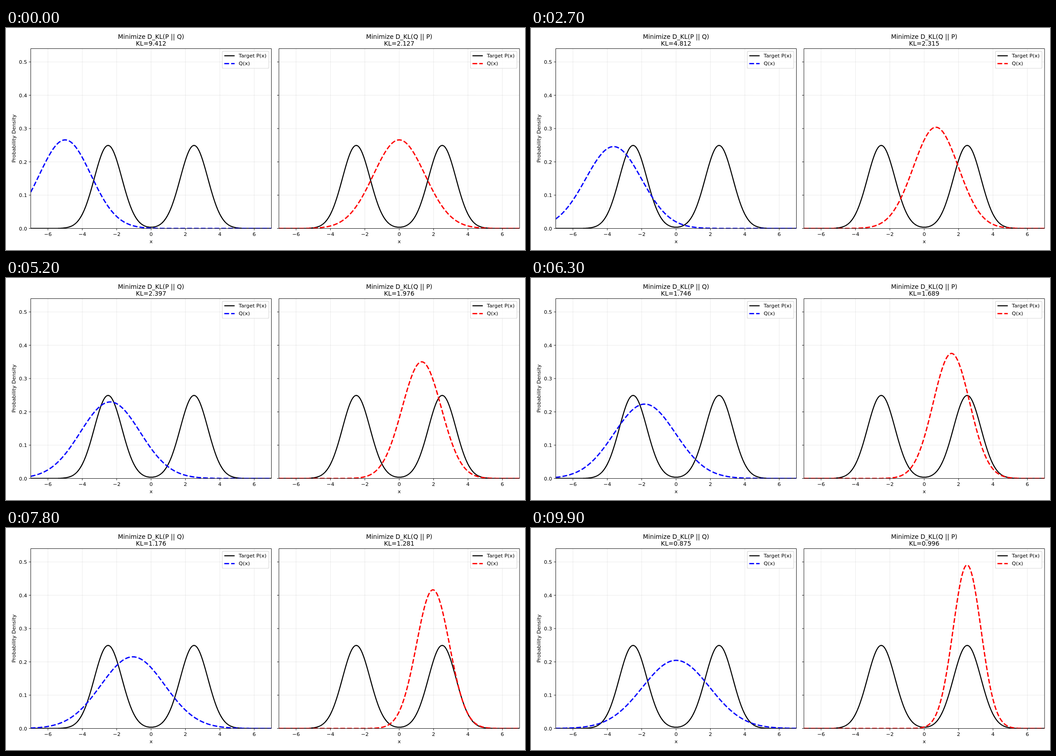
An HTML page with a canvas that plays this animation: 1143x490 px, repeating every 10 s.

```html
<!DOCTYPE html>
<html lang="en">
<head>
<meta charset="utf-8">
<title>Forward and reverse KL divergence</title>
<style>
  html, body { margin: 0; width: 100%; height: 100%; overflow: hidden; background: #fff; }
  canvas { display: block; }
</style>
</head>
<body>
<canvas id="stage" width="1143" height="490"></canvas>
<script>
const ctx = document.getElementById('stage').getContext('2d');
const FRAMES = 100, FRAME_MS = 100;
const PT = 1.134;                       // one typographic point in pixels
const TOP = 45.5, BOTTOM = 442.5, WIDTH = 530;
const Y_MAX = 0.54, SAMPLES = 700, DX = 14 / SAMPLES;
const xs = Array.from({ length: SAMPLES + 1 }, (_, i) => -7 + i * DX);

const gauss = (x, mean, sd) =>
  Math.exp(-((x - mean) ** 2) / (2 * sd * sd)) / (sd * Math.sqrt(2 * Math.PI));
const target = xs.map(x => (gauss(x, -2.5, 0.8) + gauss(x, 2.5, 0.8)) / 2);
const lerp = ([a, b], u) => a + (b - a) * u;

// Divergence in bits
const divergence = (a, b) =>
  a.reduce((sum, p, i) => sum + p * Math.log2(p / Math.max(b[i], 1e-10)) * DX, 0);

const panels = [
  { left: 54.5, name: 'P || Q', color: '#00f', mean: [-5, 0], sd: [1.5, 1.95],
    kl: q => divergence(target, q), yLabels: true },
  { left: 601, name: 'Q || P', color: '#f00', mean: [0, 2.4918], sd: [1.5, 0.8128],
    kl: q => divergence(q, target) }
];

const py = v => BOTTOM - v / Y_MAX * (BOTTOM - TOP);

function line(points, color, width, dashed) {
  ctx.beginPath();
  points.forEach(([x, y]) => ctx.lineTo(x, y));
  ctx.strokeStyle = color;
  ctx.lineWidth = width * PT;
  ctx.setLineDash(dashed ? [3.7 * width * PT, 1.6 * width * PT] : []);
  ctx.stroke();
  ctx.setLineDash([]);
}

function text(str, x, y, align = 'center', points = 10) {
  ctx.font = `${points * PT}px "DejaVu Sans", sans-serif`;
  ctx.textAlign = align;
  ctx.fillStyle = '#000';
  ctx.fillText(str, x, y);
}

function drawLegend(right, color) {
  ctx.beginPath();
  ctx.roundRect(right - 108.2, 51.4, 102.5, 37.6, 2.3);
  ctx.fillStyle = 'rgba(255,255,255,.8)';
  ctx.fill();
  ctx.strokeStyle = 'rgba(204,204,204,.8)';
  ctx.lineWidth = PT;
  ctx.stroke();
  const x = right - 103.7;
  line([[x, 61.3], [x + 22.7, 61.3]], '#000', 2);
  line([[x, 78.6], [x + 22.7, 78.6]], color, 2.5, true);
  text('Target P(x)', x + 31.8, 65, 'left');
  text('Q(x)', x + 31.8, 82.3, 'left');
}

function drawPanel({ left, name, color, mean, sd, kl, yLabels }, u) {
  const right = left + WIDTH, mid = left + WIDTH / 2;
  const px = x => mid + x * WIDTH / 14;
  const m = lerp(mean, u), s = lerp(sd, u);
  const q = xs.map(x => gauss(x, m, s));
  const curve = values => values.map((v, i) => [px(xs[i]), py(v)]);
  const grid = 'rgba(176,176,176,.3)';

  for (let v = -6; v <= 6; v += 2) {
    const x = px(v);
    line([[x, TOP], [x, BOTTOM]], grid, 0.8);
    line([[x, BOTTOM], [x, BOTTOM + 4]], '#000', 0.8);
    text(String(v).replace('-', '\u2212'), x, 459);
  }
  for (let k = 0; k <= 5; k++) {
    const y = py(k / 10);
    line([[left, y], [right, y]], grid, 0.8);
    line([[left - 4, y], [left, y]], '#000', 0.8);
    if (yLabels) text((k / 10).toFixed(1), left - 8, y + 4.2, 'right');
  }

  ctx.save();
  ctx.beginPath();
  ctx.rect(left, TOP, WIDTH, BOTTOM - TOP);
  ctx.clip();
  line(curve(target), '#000', 2);
  line(curve(q), color, 2.5, true);
  ctx.restore();

  ctx.strokeStyle = '#000';
  ctx.lineWidth = 0.8 * PT;
  ctx.strokeRect(left, TOP, WIDTH, BOTTOM - TOP);
  drawLegend(right, color);

  text(`Minimize D_KL(${name})`, mid, 23.5, 'center', 12);
  text(`KL=${kl(q).toFixed(3)}`, mid, 39, 'center', 12);
  text('x', mid, 475);
}

function draw(now) {
  const step = Math.floor(now / FRAME_MS) % FRAMES;
  ctx.fillStyle = '#fff';
  ctx.fillRect(0, 0, 1143, 490);
  ctx.lineJoin = 'round';
  panels.forEach(panel => drawPanel(panel, step / (FRAMES - 1)));
  ctx.save();
  ctx.translate(20.6, 244);
  ctx.rotate(-Math.PI / 2);
  text('Probability Density', 0, 0);
  ctx.restore();
}

const start = performance.now();
function tick() {
  draw(performance.now() - start);
  requestAnimationFrame(tick);
}
tick();
</script>
</body>
</html>
```
